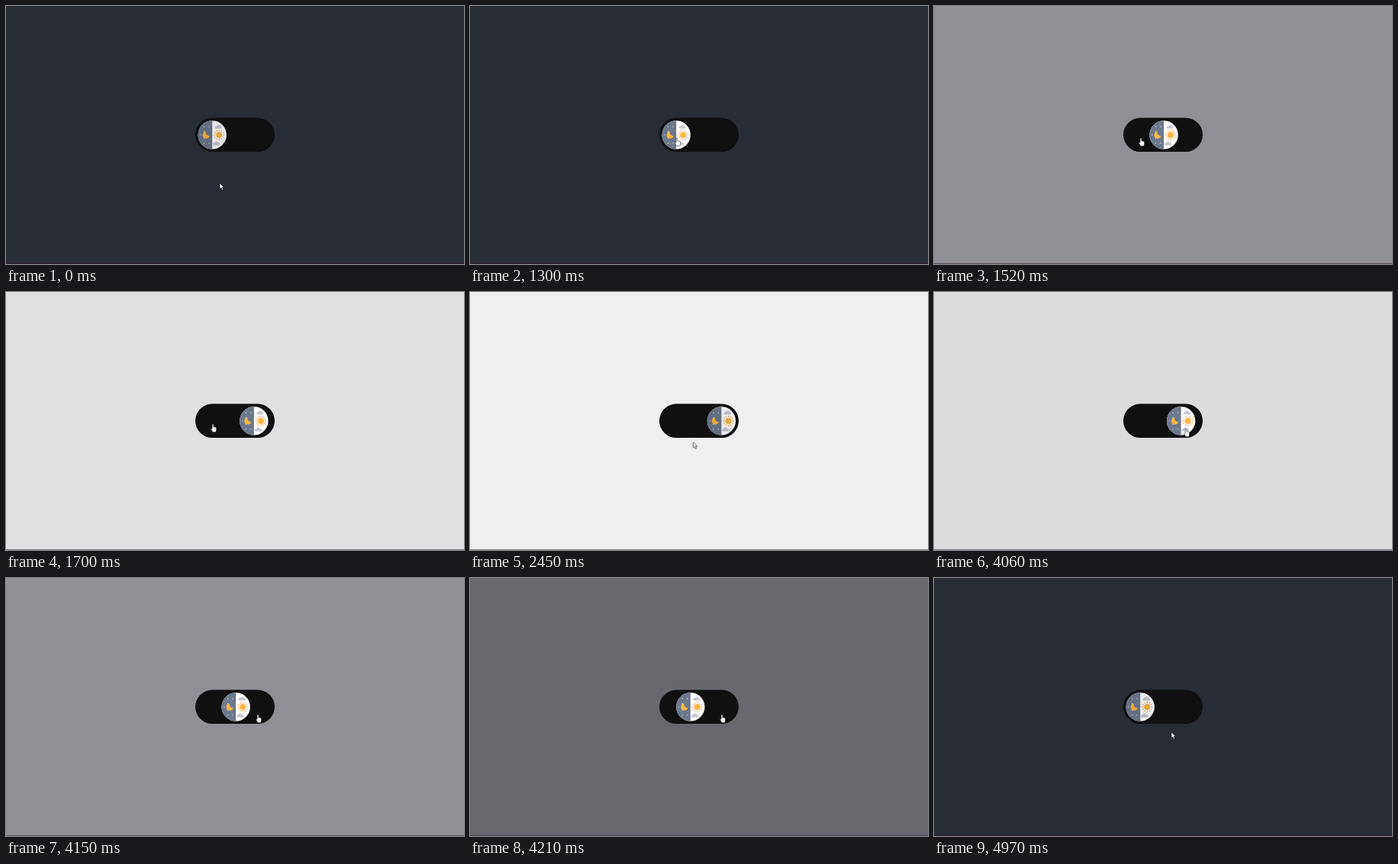
An HTML page for the animation above (5000 ms loop, 600 px wide and 338 px high).

```html
<!DOCTYPE html>
<html lang="en">
<head>
<meta charset="utf-8">
<title>Day and night switch</title>
<style>
  html, body { margin: 0; width: 100%; height: 100%; overflow: hidden; background: #282c34; }
  svg { display: block; width: 100%; height: 100%; }
</style>
</head>
<body>
<svg viewBox="0 0 600 338">
  <defs>
    <clipPath id="disc"><circle r="18.7"/></clipPath>
    <g id="cloud">
      <circle cx="-2.8" cy=".4" r="1.7"/>
      <circle cy="-.7" r="2.3"/>
      <circle cx="2.6" cy=".3" r="1.8"/>
      <rect x="-4.5" y=".3" width="9" height="1.8" rx=".9"/>
    </g>
  </defs>
  <rect id="page" width="600" height="338"/>
  <rect y="337.5" width="600" height=".5" fill="#2b1030"/>
  <rect x="248" y="146.5" width="104" height="44.6" rx="22.3" fill="#101011"/>
  <g id="ball">
    <g clip-path="url(#disc)">
      <rect x="-20" y="-20" width="40" height="40" fill="#fff"/>
      <rect x="-20" y="-20" width="20" height="40" fill="#6d788c"/>
      <path id="stars" stroke="#e4e8f0" stroke-width="1.4" stroke-linecap="round"/>
      <path d="M-8-4.4A4.5 4.5 0 1 0-3.6.8A3.7 3.7 0 0 1-8-4.4z" fill="#fdb93f"/>
      <path id="rays" stroke="#f59a42" stroke-width="1" stroke-linecap="round"/>
      <circle cx="9" r="3.7" fill="#fdb840" stroke="#f5a03e" stroke-width=".6"/>
      <g fill="#c6c9d4">
        <use href="#cloud" x="8" y="-10.5"/>
        <use href="#cloud" x="5.6" y="11.4"/>
      </g>
    </g>
  </g>
  <g id="arrow">
    <path d="M0 0V7.6L1.8 6L3 8.8L4.4 8.2L3.2 5.5H5.5z" fill="#fff" stroke="#16181c" stroke-width=".6"/>
  </g>
  <g id="hand">
    <path d="M-.9.5Q0-.6.9.5V3.8Q3 3.4 4.6 5V7.6Q4.4 9 3.8 10.4H-.2Q-1.4 8.4-2.7 6.6Q-2.4 5.2-.9 6.2z" fill="#fff" stroke="#111" stroke-width=".5"/>
  </g>
</svg>
<script>
const $ = id => document.getElementById(id);
const LOOP = 5000, FADE = 500;
const DARK = [40, 44, 52], LIGHT = [239, 238, 240];
const TO_LIGHT = 1369, TO_DARK = 4010;
const HOVERS = [{ on: 530, off: 2200 }, { on: 3225, off: 4690 }];

// Straight pointer moves, each starting where the last one ended
const HOME = { x: 280, y: 232 };
const MOVES = [
  { from: 150, to: 690, x: 271, y: 173 },
  { from: 1840, to: 2360, x: 286, y: 195 },
  { from: 2360, to: 2920, x: 325, y: 205 },
  { from: 2920, to: 3450, x: 330, y: 179 },
  { from: 4540, to: 4960, x: 311, y: 202 }
];

const clamp = v => Math.max(0, Math.min(1, v));
const mix = (a, b, k) => a + (b - a) * k;

// CSS "ease": cubic-bezier(.25, .1, .25, 1)
function ease(x) {
  if (x <= 0 || x >= 1) return clamp(x);
  const curve = (a, b, u) => 3 * a * u * (1 - u) ** 2 + 3 * b * u * u * (1 - u) + u ** 3;
  let lo = 0, hi = 1;
  for (let i = 0; i < 24; i++) {
    const mid = (lo + hi) / 2;
    if (curve(.25, .25, mid) < x) lo = mid; else hi = mid;
  }
  return curve(.1, 1, lo);
}

const fade = (t, start) => ease((t - start) / FADE);
const between = (t, on, off) => fade(t, on) - fade(t, off);

const pointer = t => MOVES.reduce((p, m) => {
  const k = clamp((t - m.from) / (m.to - m.from));
  return { x: mix(p.x, m.x, k), y: mix(p.y, m.y, k) };
}, HOME);

function render(t) {
  const day = between(t, TO_LIGHT, TO_DARK);
  const glow = HOVERS.reduce((sum, h) => sum + between(t, h.on, h.off), 0);
  const over = HOVERS.some(h => t >= h.on && t < h.off);
  const { x, y } = pointer(t);

  $('page').setAttribute('fill', `rgb(${DARK.map((c, i) => Math.round(mix(c, LIGHT[i], day)))})`);
  $('ball').setAttribute('transform', `translate(${mix(270.2, 329.4, day)} 168.9)`);
  $('ball').setAttribute('opacity', mix(.9, 1, clamp(glow)));
  for (const [id, shown] of [['arrow', !over], ['hand', over]]) {
    $(id).setAttribute('transform', `translate(${x} ${y})`);
    $(id).setAttribute('visibility', shown ? 'visible' : 'hidden');
  }
}

const repeat = (n, draw) => Array.from({ length: n }, (_, i) => draw(i)).join('');
const polar = (cx, r, a) => `${cx + r * Math.cos(a)} ${r * Math.sin(a)}`;

$('rays').setAttribute('d', repeat(12, i => {
  const a = i * Math.PI / 6;
  return `M${polar(9, 5.4, a)}L${polar(9, 6.7, a)}`;
}));

// Stars alternate between two rings on the night side
$('stars').setAttribute('d', repeat(7, i =>
  `M${polar(0, i % 2 ? 15.2 : 11.5, Math.PI * (.62 + i * .127))}h.01`));

function tick() {
  render(performance.now() % LOOP);
  requestAnimationFrame(tick);
}
tick();
</script>
</body>
</html>
```
